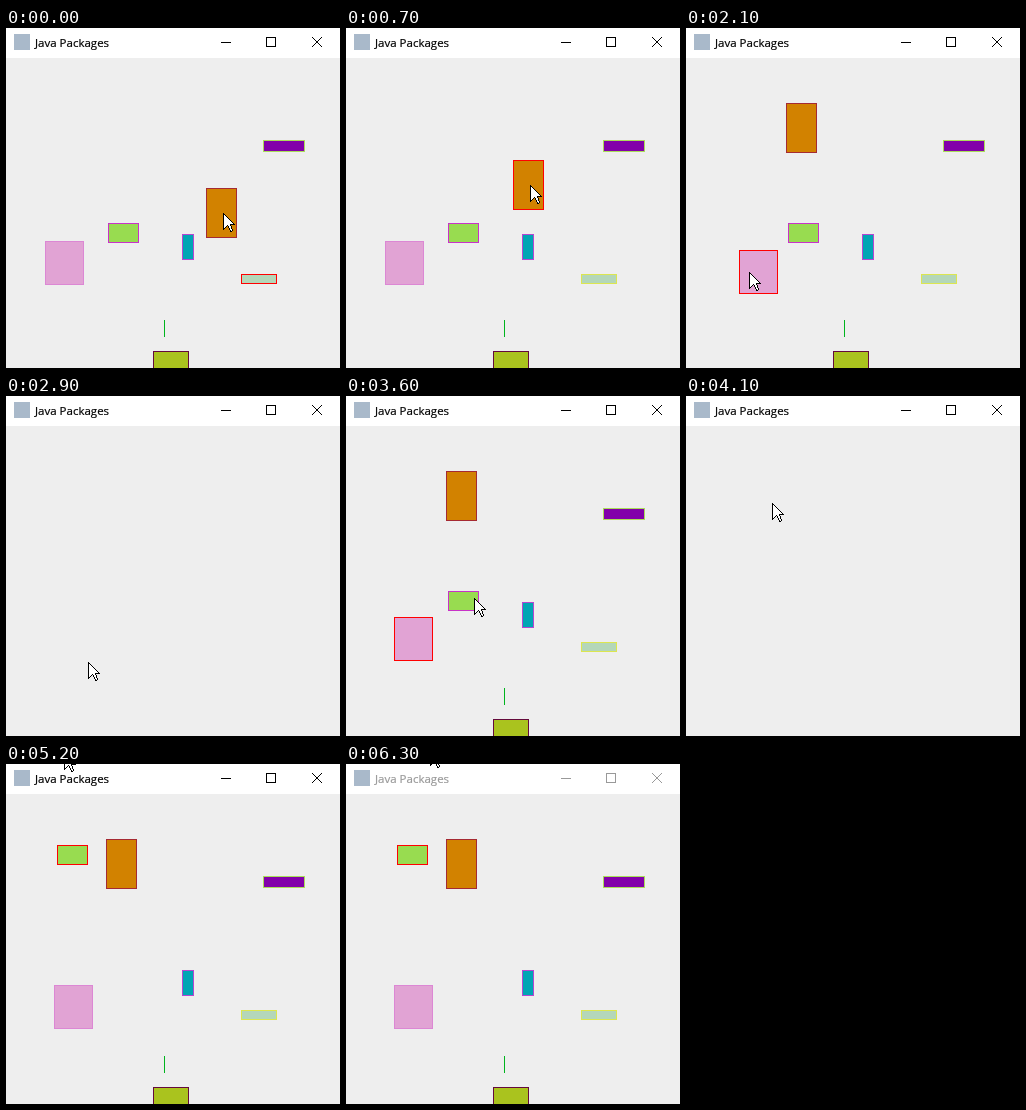
Animation of 334x340 px, one loop 6.4 s. Source, as an HTML page with a canvas:

```html
<!DOCTYPE html>
<html lang="en">
<head>
<meta charset="utf-8">
<title>Java Packages</title>
<style>
  html, body { margin: 0; width: 334px; height: 340px; overflow: hidden; background: #fff; }
  canvas { position: absolute; left: 0; top: 0; display: block; }
  #title {
    position: absolute; left: 29px; top: 7px; line-height: 16px; white-space: pre;
    font-family: "Open Sans", "Noto Sans", sans-serif; font-size: 11.5px;
    -webkit-text-stroke: .2px currentColor;
  }
</style>
</head>
<body>
<div id="title">Java Packages</div>
<canvas id="stage" width="334" height="340"></canvas>
<script>
const ctx = document.getElementById("stage").getContext("2d");
const title = document.getElementById("title");
const LOOP = 6400, STEP = 100, FIRST_CLICK = 300, BLUR = 6200;

// The pointer glides in straight lines and rests between them
const glides = [];
let last = { x: 217, y: 185, end: 0 };
function glide(wait, time, x, y) {
  const start = last.end + wait;
  last = { from: last, start, end: start + time, x, y };
  glides.push(last);
}
glide(500, 600, 117, 100);
glide(0, 200, 105, 185);
glide(0, 200, 49, 235);
glide(0, 300, 63, 244);
glide(300, 800, 82, 266);
glide(0, 300, 58, 243);
glide(100, 300, 128, 202);
glide(0, 600, 77, 88);
glide(0, 400, 178, 169);
glide(100, 500, 58, -11);
glide(400, 200, 49, -13);
glide(100, 400, 84, -15);

function pointer(t) {
  const g = glides.findLast(g => g.start <= t);
  if (!g) return glides[0].from;
  const k = Math.min(1, (t - g.start) / (g.end - g.start));
  const mix = (a, b) => Math.round(a + (b - a) * k);
  return { x: mix(g.from.x, g.x), y: mix(g.from.y, g.y) };
}

const box = (x, y, w, h, fill, line, drag) => ({ x, y, w, h, fill, line, drag });
const drag = (press, release, start = press) => ({ press, start, release });
const pale = box(235, 246, 35, 9, "#b4d7b9", "#dce650");
const boxes = [
  pale,
  box(257, 112, 41, 11, "#8200aa", "#aadc5a"),
  box(176, 206, 11, 25, "#00a5b4", "#b446d2"),
  box(147, 323, 35, 30, "#aac31e", "#640a3c"),
  box(158, 292, 0, 16, "#00b41e", "#00b41e"),
  box(200, 160, 30, 49, "#d28200", "#a52a32", drag(FIRST_CLICK, 1100, 500)),
  box(39, 213, 38, 43, "#e1a3d4", "#dc87d4", drag(1500, 3200)),
  box(102, 195, 30, 19, "#98dc50", "#c832c8", drag(3600, 4200))
];

// Every third step of a drag catches the panel cleared, before its repaint
function cleared(t) {
  const dragging = boxes.some(({ drag: d }) => d && t > d.start && t < d.release);
  return t === FIRST_CLICK || (dragging && t % (3 * STEP) === 2 * STEP);
}

const selected = t => boxes.findLast(b => b.drag && t > b.drag.press) || pale;

function drawBox(b, t) {
  let { x, y } = b;
  if (b.drag && t > b.drag.start) {
    const from = pointer(b.drag.start), to = pointer(Math.min(t, b.drag.release));
    x += to.x - from.x;
    y += to.y - from.y;
  }
  ctx.fillStyle = b.fill;
  ctx.fillRect(x, y, b.w + 1, b.h + 1);
  ctx.strokeStyle = b === selected(t) ? "#f00" : b.line;
  if (b.w) ctx.strokeRect(x + .5, y + .5, b.w, b.h);
}

function drawBar(color) {
  ctx.fillStyle = "#a9b9ca";
  ctx.fillRect(8, 6, 16, 16);
  ctx.fillStyle = ctx.strokeStyle = color;
  ctx.fillRect(215, 14, 10, 1);
  ctx.strokeRect(260.5, 9.5, 9, 9);
  ctx.beginPath();
  ctx.moveTo(306, 9); ctx.lineTo(316, 19);
  ctx.moveTo(316, 9); ctx.lineTo(306, 19);
  ctx.stroke();
}

// Crisp line of whole pixels
function pixelLine([x0, y0], [x1, y1]) {
  const n = Math.max(Math.abs(x1 - x0), Math.abs(y1 - y0));
  for (let i = 0; i <= n; i++) {
    ctx.fillRect(Math.round(x0 + (x1 - x0) * i / n), Math.round(y0 + (y1 - y0) * i / n), 1, 1);
  }
}

const arrow = [[0, 0], [0, 16], [4, 12], [7, 18], [9, 17], [7, 11], [11, 11]];
function drawPointer({ x, y }) {
  const points = arrow.map(([px, py]) => [x + px, y + py]);
  ctx.beginPath();
  points.forEach(([px, py]) => ctx.lineTo(px + .5, py + .5));
  ctx.fillStyle = "#fff";
  ctx.fill();
  ctx.fillStyle = "#000";
  points.forEach((p, i) => pixelLine(p, points[(i + 1) % points.length]));
}

function draw(t) {
  const color = t >= BLUR ? "#999" : "#000";
  title.style.color = color;
  ctx.clearRect(0, 0, 334, 340);
  ctx.fillStyle = "#eee";
  ctx.fillRect(0, 30, 334, 310);
  drawBar(color);
  if (!cleared(t)) boxes.forEach(b => drawBox(b, t));
  drawPointer(pointer(t));
}

const begin = performance.now();
function tick() {
  const t = (performance.now() - begin) % LOOP;
  draw(Math.floor(t / STEP) * STEP);
  requestAnimationFrame(tick);
}
tick();
</script>
</body>
</html>
```
